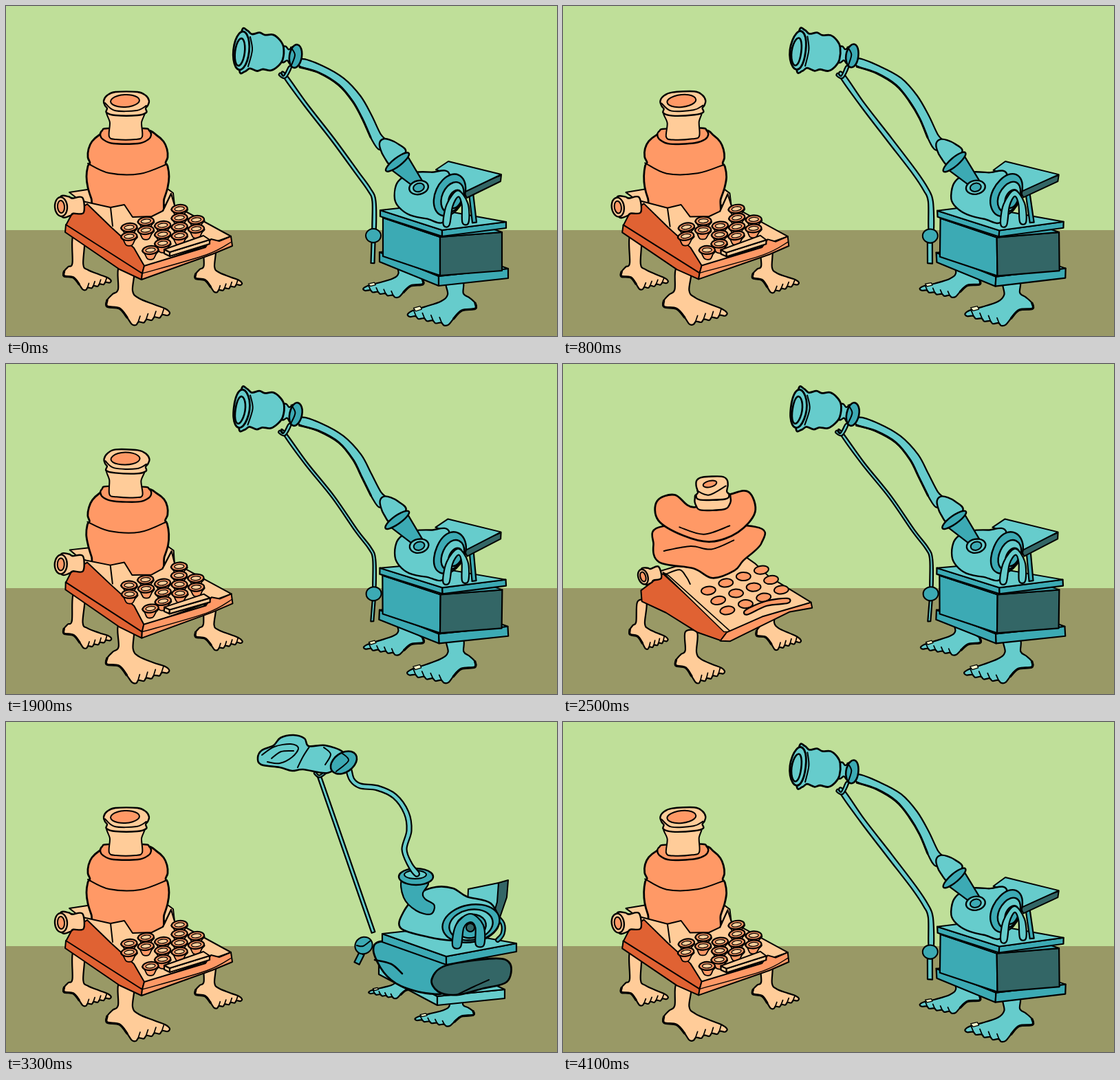
An HTML page with a canvas for the animation above (4200 ms loop, 801 by 480 pixels).

```html
<!DOCTYPE html>
<html lang="en">
<head>
<meta charset="utf-8">
<title>Two walking machines</title>
<style>
html, body { margin: 0; width: 100%; height: 100%; overflow: hidden; }
canvas { display: block; }
</style>
</head>
<body>
<canvas id="stage" width="801" height="480"></canvas>
<script>
const ctx = document.getElementById('stage').getContext('2d');
const LOOP = 4200, STEP = 100;
const peach = '#ffcc99', orange = '#ff9966', rust = '#e06233';
const teal = '#66cccc', sea = '#3caab4', deep = '#336666', nail = '#ffffcc';
const DOWN = Math.PI / 2;
let phase = 0;   // which of the three line drawings is showing

ctx.lineJoin = ctx.lineCap = 'round';

// Small smooth wobble that makes the ink line boil.
function warp([x, y]) {
  const a = phase ? 0.7 : 0;
  return [x + a * Math.sin(y * 0.09 + phase * 2.4), y + a * Math.sin(x * 0.08 + phase * 4.1)];
}

const parse = text => text.split(' ').map(p => p.split(',').map(Number));
const mix = (a, b, t) => a + (b - a) * t;

function trace(points, closed, smooth) {
  const pts = points.map(warp), n = pts.length;
  const at = i => closed ? pts[(i + n) % n] : pts[Math.max(0, Math.min(n - 1, i))];
  ctx.beginPath();
  ctx.moveTo(...pts[0]);
  for (let i = 0; i < (closed ? n : n - 1); i++) {
    const [a, b, c, d] = [at(i - 1), at(i), at(i + 1), at(i + 2)];
    if (!smooth) ctx.lineTo(...c);
    else ctx.bezierCurveTo(
      b[0] + (c[0] - a[0]) / 6, b[1] + (c[1] - a[1]) / 6,
      c[0] - (d[0] - b[0]) / 6, c[1] - (d[1] - b[1]) / 6, ...c);
  }
  if (closed) ctx.closePath();
}

function ink(width) {
  ctx.lineWidth = width;
  if (width) ctx.stroke();
}

function area(fill, pts, width = 2.2, smooth = true) {
  trace(pts, true, smooth);
  ctx.fillStyle = fill;
  ctx.fill();
  ink(width);
}

const blob = (fill, text, width) => area(fill, parse(text), width);
const poly = (fill, text, width = 2) => area(fill, parse(text), width, false);
const line = (text, width = 2) => { trace(parse(text), false, true); ink(width); };

function oval(fill, cx, cy, rx, ry, tilt = 0, width = 2) {
  const c = Math.cos(tilt), s = Math.sin(tilt);
  area(fill, Array.from({ length: 12 }, (_, i) => {
    const u = rx * Math.cos(i * Math.PI / 6), v = ry * Math.sin(i * Math.PI / 6);
    return [cx + u * c - v * s, cy + u * s + v * c];
  }), width);
}

// Turned shape: pairs of distance along the axis and radius.
function lathe(fill, x, y, angle, profile, width = 2.4, smooth = true) {
  const c = Math.cos(angle), s = Math.sin(angle), rings = parse(profile);
  const side = sign => rings.map(([d, r]) => [x + d * c - sign * r * s, y + d * s + sign * r * c]);
  area(fill, [...side(1), ...side(-1).reverse()], width, smooth);
}

// Band along a centre line, its width running from w0 to w1.
function ribbon(fill, text, w0, w1 = w0) {
  const mid = parse(text), last = mid.length - 1;
  const side = sign => mid.map(([x, y], i) => {
    const [ax, ay] = mid[Math.max(0, i - 1)], [bx, by] = mid[Math.min(last, i + 1)];
    const k = sign * mix(w0, w1, i / last) / 2 / Math.hypot(bx - ax, by - ay);
    return [x - (by - ay) * k, y + (bx - ax) * k];
  });
  area(fill, [...side(1), ...side(-1).reverse()], 2.2, last > 1);
}

// Box seen over its front corner; corners are left, front, right, back.
function slab(corners, height, top, left, right) {
  const [l, f, r, b] = parse(corners);
  const low = ([x, y]) => [x, y + height];
  area(left, [l, f, low(f), low(l)], 2.2, false);
  area(right, [f, r, low(r), low(f)], 2.2, false);
  area(top, [l, f, r, b], 2, false);
}

// Foot below an ankle at x, y; a negative sx turns it to the left.
function foot(fill, x, y, sx, sy, legTop) {
  const at = ([u, v]) => [x + u * sx, y + v * sy];
  const toes = [], notches = [];
  for (let i = 0; i < 5; i++) {
    const u = mix(12, 58, i / 4), v = mix(61, 47, i / 4);
    notches.push([u + 7, v - 1]);
    toes.push([u - 2, v + 2], [u + 4, v + 3], notches[i]);
  }
  const heel = parse('-10,12 -18,19 -26,28 -26,37 -8,40 3,53').map(at);
  const instep = parse('58,40 42,34 20,25 11,14').map(at);
  area(fill, [[x - 9 * sx, legTop], ...heel, ...toes.map(at), ...instep, [x + 13 * sx, legTop]]);
  trace(heel.slice(2), false, true);
  ink(3.4);
  for (const [u, v] of notches.slice(0, 4)) {
    trace([at([u, v]), at([u + 3, v - 9])], false);
    ink(1.7);
  }
  if (fill === teal) area(nail, parse('48,33 57,36 54,41 46,38').map(at), 1.3, false);
}

function key(x, y) {
  lathe(orange, x, y, DOWN, '-1,11 5,8 12,4', 1.8);
  oval(orange, x, y - 1, 11.5, 6, -0.1, 2.2);
  oval(peach, x, y - 1, 7, 3, -0.1, 1.3);
}

function roller(x, y, angle, size) {
  const k = size / 14;
  lathe(peach, x, y, angle, `0,${size} ${12 * k},${size} ${17 * k},${11 * k} ${32 * k},${11 * k}`);
  oval(peach, x, y, 9 * k, size, angle, 2.4);
  oval(orange, x, y, 5 * k, 9 * k, angle);
}

function typewriter() {
  foot(peach, 104, 365, 0.75, 0.75, 335);
  foot(peach, 295, 369, 0.74, 0.74, 350);
  foot(peach, 173, 400, 1, 1, 380);

  poly(peach, '92,271 125,266 235,266 243,272 245,290 114,288');
  lathe(orange, 177, 180, DOWN, '0,26 8,42 17,52 28,57 40,58 48,55 53,58 68,60 84,58 100,53 130,42', 2.8);
  line('119,229 150,243 195,244 234,230');
  lathe(orange, 174, 178, DOWN, '0,26 3,34 9,37 16,33 22,18');
  lathe(peach, 174, 150, DOWN, '0,25 20,23 40,24 44,14', 2);
  lathe(peach, 175, 125, DOWN, '0,16 5,28 13,33 20,31 24,28 30,29 34,16');
  line('144,141 158,152 190,152 204,145');
  oval(orange, 173, 138, 21, 9, -0.05);

  poly(peach, '92,278 116,285 152,293 172,289 184,307 212,306 228,298 240,273 245,290 327,335 202,380');
  poly(rust, '118,288 152,321 186,352 201,378 198,389 168,374 87,319 95,304');
  line('152,293 155,320');
  line('240,273 228,298');
  poly(rust, '87,318 198,389 197,398 165,383 86,329');
  poly(orange, '201,378 290,351 298,339 310,342 327,335 329,349 300,361 197,398 198,389');
  line('198,389 291,362 328,343', 1.4);

  const tops = [323, 314, 320, 296, 312], counts = [2, 2, 3, 4, 2];
  tops.forEach((top, c) => {
    for (let r = 0; r < counts[c]; r++) key(179 + 24.4 * c, top + 13 * r);
  });
  key(210, 356);
  slab('230,354 238,358 296,340 287,334', 6, peach, peach, peach);
  roller(80, 292, -0.07, 14);
}

function typewriterSquashed() {
  foot(peach, 113, 366, 0.6, 0.75, 346);
  foot(peach, 300, 365, 0.7, 0.8, 358);
  foot(peach, 185, 406, 0.78, 0.9, 390);

  poly(peach, '138,302 165,295 240,300 266,281 280,290 300,309 360,346 240,392 148,310');
  blob(orange, '146,236 131,262 140,288 190,297 218,311 250,301 262,286 288,260 280,236', 2.6);
  line('146,272 185,265 215,269 248,257');
  blob(orange, '190,208 162,191 136,199 139,227 175,250 215,258 255,245 279,215 270,186 243,190', 2.8);
  line('170,238 205,247 243,236');
  lathe(peach, 217, 188, DOWN, '0,20 8,26 18,24 24,16');
  lathe(peach, 217, 164, DOWN, '0,14 5,22 13,23 22,21 27,24 33,18');
  line('195,184 212,190 237,178');
  oval(orange, 214, 174, 10, 4.5, -0.2);

  poly(rust, '146,305 240,392 230,403 196,390 150,362 114,345 113,329');
  poly(peach, '146,303 154,308 244,390 234,390', 1.6);
  poly(orange, '238,391 290,367 360,346 362,354 330,361 242,404 228,403');
  line('150,306 170,300 180,310 185,320');
  for (let r = 0; r < 3; r++) {
    for (let c = 0; c < 4; c++) oval(orange, 211 + 26 * c + 14 * r, 329 - 10 * c + 15 * r, 10.5, 6, -0.1);
  }
  ribbon(orange, '267,361 295,348 326,345', 7);
  roller(117, 309, -0.25, 11);
}

function phone() {
  const rod = [5, 4, 7][phase];
  foot(teal, 581, 379, -0.95, 0.7, 372);
  foot(teal, 654, 407, -1.08, 0.9, 400);

  // box
  slab('543,358 629,393 730,382 640,350', 14, teal, sea, sea);
  slab('548,308 631,336 721,329 640,300', 56, sea, sea, deep);
  slab('544,297 634,326 727,314 600,291', 9, teal, sea, sea);

  // lever and barrel
  ribbon(sea, '676,272 681,315', 6);
  poly(deep, '720,246 719,255 670,279 664,268');
  poly(teal, '625,238 643,226 720,245 668,270 650,248');
  lathe(teal, 570, 271, 0.1, '-4,10 4,22 20,31 45,34 72,33');
  for (let k = 0; k < 3; k++) oval(k % 2 ? teal : sea, 645 + 4 * k, 275 + 3 * k, 21 - 6 * k, 32 - 9 * k, 0.42, 2.4);
  ribbon(teal, '640,318 645,290 657,273 667,288 668,315', 9);

  // rod
  ribbon(teal, '405,101 436,144 475,194 510,242 528,267 535,284 535,328', rod);
  ribbon(teal, '398,99 405,103 413,89', 4);
  ribbon(teal, '534,344 533,374', rod);
  oval(sea, 534, 334, 11, 10);

  // arm
  ribbon(teal, '428,82 457,92 487,110 510,135 525,162 538,190 549,204', 11, 16);
  line('427,89 455,97 484,115 504,139 518,164 530,191', 3);
  lathe(teal, 546, 196, 0.8, '0,4 8,10 20,14 36,14');
  lathe(sea, 570, 226, 0.84, '0,16 46,7', 2.2, false);
  oval(sea, 569, 227, 21, 6, -0.66, 2.4);
  oval(teal, 600, 264, 14, 10, -0.2, 2.4);
  oval(sea, 600, 264, 8, 6, -0.3);

  // horn
  lathe(teal, 402, 70, 0.15, '-8,6 2,12 8,8 14,12');
  lathe(teal, 341, 65, 0.06, '0,28 8,30 15,25 26,28 34,25 46,26 56,19 62,9', 2.8);
  line('355,45 358,64 352,88');
  oval(teal, 342, 65, 11.5, 28, 0.1, 2.8);
  oval(teal, 340, 67, 7, 20, 0.12, 2.6);
  oval(sea, 421, 73, 9, 17, 0.15, 2.6);
  line('414,60 420,71 415,86');
}

function phoneSquashed() {
  foot(teal, 576, 370, -0.75, 0.5, 368);
  foot(teal, 655, 404, -0.93, 0.6, 396);

  slab('542,354 627,399 725,389 640,350', 13, teal, teal, teal);
  blob(sea, '547,319 534,332 549,364 574,384 615,395 640,390 655,345 600,325', 2.8);
  line('536,346 560,352 576,366', 2.6);
  blob(deep, '640,354 710,344 733,352 728,378 692,388 655,397 628,392 619,374', 2.8);
  line('655,397 680,385 702,375');
  slab('547,308 640,341 742,322 620,300', 12, teal, sea, sea);

  ribbon(sea, '712,282 722,293 722,308 714,318', 5);
  poly(deep, '716,234 730,230 728,255 718,284 708,282');
  poly(teal, '672,243 716,234 714,262 708,282 671,266');
  blob(teal, '574,300 578,276 600,250 625,240 650,242 670,254 705,264 716,296 690,318 650,318 615,313', 2.6);
  for (let k = 0; k < 3; k++) oval(k % 2 ? teal : sea, 676, 293 + 2 * k, 42 - 10 * k, 27 - 5 * k, -0.2, 2.4);
  ribbon(sea, '655,326 660,297 675,285 688,297 689,324', 12);
  oval(deep, 675, 299, 6, 6);

  // rod and arm
  ribbon(teal, '455,78 534,306', 5);
  ribbon(teal, '449,74 456,79 468,70', 3);
  ribbon(sea, '517,337 510,351', 8);
  oval(sea, 520, 325, 13, 12, -0.6);
  line('510,325 519,326 530,318');
  ribbon(sea, '595,230 592,252 603,266 620,273', 36, 14);
  oval(sea, 596, 225, 25, 12, 0, 2.4);
  oval(teal, 595, 222, 16, 6);
  ribbon(teal, '498,68 503,84 515,93 540,96 565,108 582,132 586,158 579,185 587,207 598,222', 7);

  // horn
  blob(teal, '366,52 372,41 389,34 399,23 418,19 434,24 440,35 464,34 489,43 489,56 468,74 432,69 416,71 398,66 371,62', 2.6);
  line('372,48 390,36 414,32 425,38 416,51 398,60 380,58');
  line('386,53 400,43 418,42');
  line('424,66 432,50 441,36');
  line('462,37 472,47 464,62');
  oval(sea, 491, 59, 21, 14, -0.6, 2.6);
  line('488,45 498,56 480,72');
}

// Draws a figure scaled and leaned about the point where it stands.
function posed(draw, x, y, sx, sy, lean = 0) {
  ctx.save();
  ctx.translate(x, y);
  ctx.transform(sx, 0, -lean, sy, 0, 0);
  ctx.translate(-x, -y);
  draw();
  ctx.restore();
}

function render() {
  const tick = Math.floor(performance.now() % LOOP / STEP);
  phase = tick % 3;
  ctx.fillStyle = '#bfdf99';
  ctx.fillRect(0, 0, 801, 326);
  ctx.fillStyle = '#999966';
  ctx.fillRect(0, 326, 801, 154);

  if (tick === 25) typewriterSquashed();
  else if (tick === 26) posed(typewriter, 200, 460, 1.02, 1.34);
  else if (tick === 27) posed(typewriter, 200, 460, 1, 0.95);
  else typewriter();

  if (tick === 33) phoneSquashed();
  else if (tick === 34) posed(phone, 620, 464, 1, 1.045, 0.17);
  else if (tick === 35) posed(phone, 620, 464, 1, 0.98, 0.03);
  else phone();

  requestAnimationFrame(render);
}
render();
</script>
</body>
</html>
```
